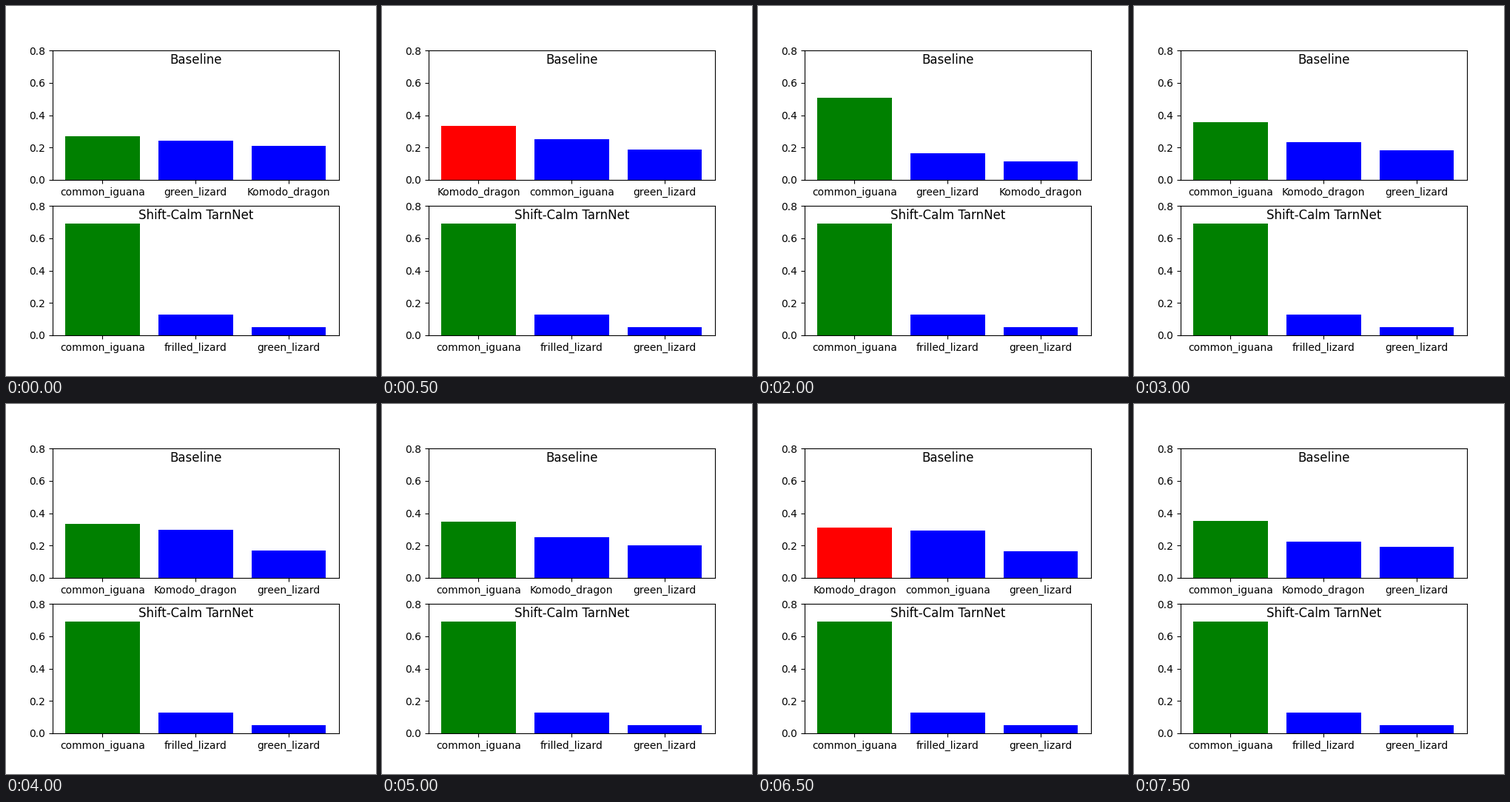
These frames come from a looping animation (500x500 px, 8 s). A matplotlib script:

```python
import matplotlib.pyplot as plt
from matplotlib.animation import FuncAnimation

TRUE_CLASS = "common_iguana"
NAMES = {
    "C": TRUE_CLASS,
    "K": "Komodo_dragon",
    "L": "green_lizard",
    "F": "frilled_lizard",
}

# Top-three classes in rank order, with their probabilities
STEADY = ("CFL", 0.690, 0.128, 0.050)
BASELINE = [
    ("CLK", 0.270, 0.243, 0.210),
    ("KCL", 0.332, 0.250, 0.188),
    ("CKL", 0.359, 0.240, 0.172),
    ("KCL", 0.316, 0.256, 0.178),
    ("CLK", 0.506, 0.165, 0.116),
    ("CLK", 0.405, 0.205, 0.165),
    ("CKL", 0.357, 0.233, 0.183),
    ("KCL", 0.359, 0.262, 0.169),
    ("CKL", 0.333, 0.297, 0.169),
    ("CKL", 0.405, 0.255, 0.144),
    ("CKL", 0.348, 0.251, 0.201),
    ("CKL", 0.469, 0.220, 0.107),
    ("CKL", 0.396, 0.285, 0.098),
    ("KCL", 0.311, 0.293, 0.165),
    ("KCL", 0.303, 0.285, 0.178),
    ("CKL", 0.352, 0.224, 0.192),
]

fig, (top_ax, low_ax) = plt.subplots(2, 1, figsize=(5, 5), dpi=100, facecolor="white")


def make_chart(ax, title):
    bars = ax.bar(range(3), [0.1] * 3, color="blue")
    ax.set_ylim(0, 0.8)
    ax.set_yticks([0, 0.2, 0.4, 0.6, 0.8])
    ax.set_title(title, y=0.85)
    return bars


def show_ranking(ax, bars, ranking):
    order, *probs = ranking
    labels = [NAMES[key] for key in order]
    for bar, prob in zip(bars, probs):
        bar.set_height(prob)
    bars[0].set_facecolor("green" if labels[0] == TRUE_CLASS else "red")
    ax.set_xticks(range(3), labels)


top_bars = make_chart(top_ax, "Baseline")
low_bars = make_chart(low_ax, "Shift-Calm TarnNet")
show_ranking(low_ax, low_bars, STEADY)


def update(i):
    show_ranking(top_ax, top_bars, BASELINE[i])
    return list(top_bars)


anim = FuncAnimation(fig, update, frames=len(BASELINE), init_func=lambda: update(0),
                     interval=500, repeat=True, repeat_delay=0, blit=False)
plt.show()
```
